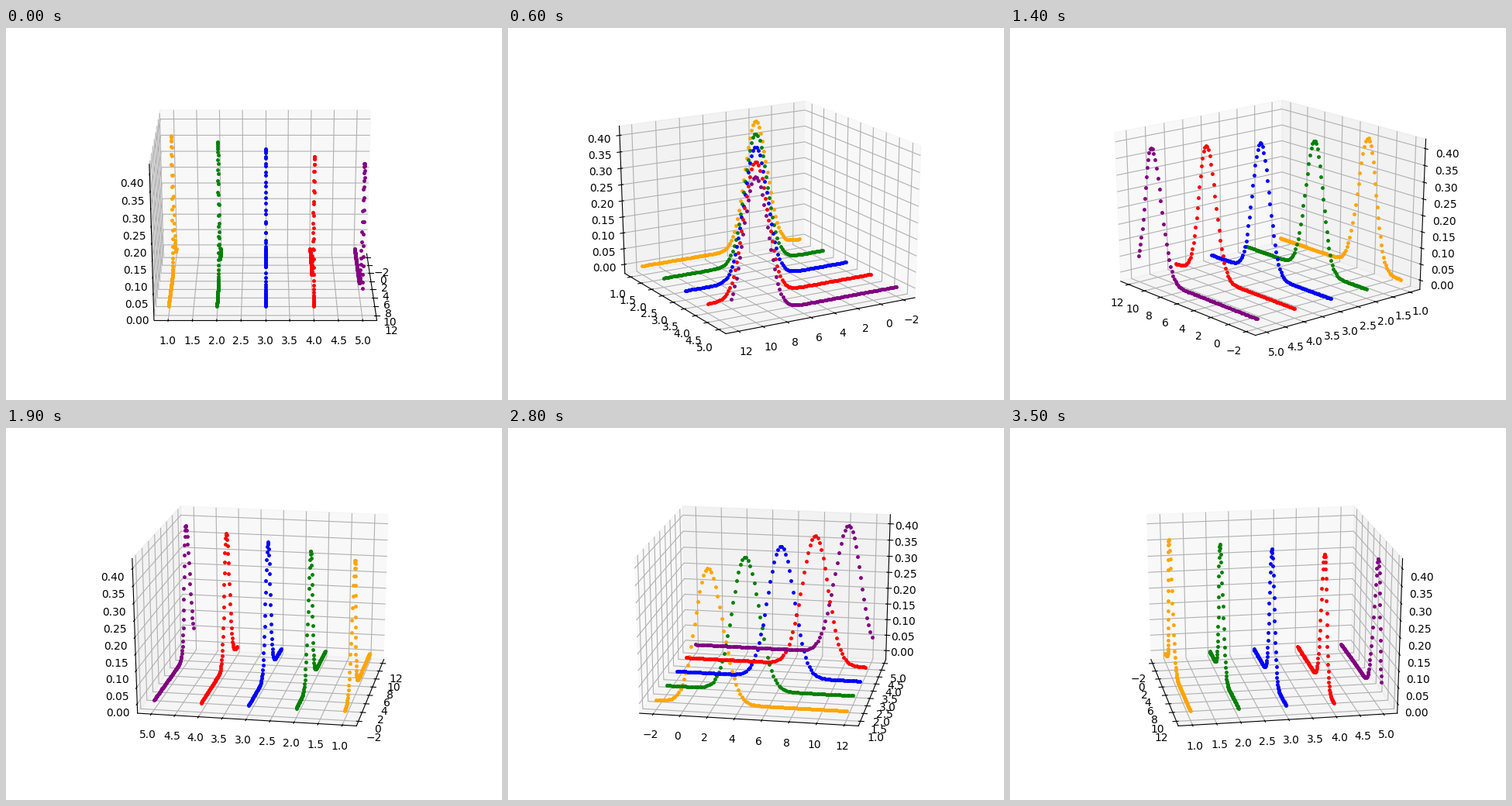
A matplotlib script for the animation above (3600 ms loop, 640 by 480 pixels).

```python
import numpy as np
import matplotlib.pyplot as plt
from matplotlib.animation import FuncAnimation
from mpl_toolkits.mplot3d import Axes3D

FRAMES = 36
COLORS = ["orange", "green", "blue", "red", "purple"]


class WideAxes(Axes3D):
    """3D axes that fill their whole rectangle instead of a square."""

    def apply_aspect(self, position=None):
        pass


def bell(x, mean):
    return np.exp(-(x - mean) ** 2 / 2) / np.sqrt(2 * np.pi)


def limits(lo, hi):
    """Data range with a 5% margin and a 1/48 border on each side."""
    mid, half = (lo + hi) / 2, (hi - lo) / 2
    half *= 1.1 * 25 / 24
    return mid - half, mid + half


fig = plt.figure(figsize=(6.4, 4.8), dpi=100, facecolor="white")
ax = WideAxes(fig, [0.125, 0.11, 0.775, 0.77])
fig.add_axes(ax)

x = np.linspace(-2, 12, 100)
top = 0
for row, color in enumerate(COLORS, 1):
    z = bell(x, 2 * row)
    top = max(top, z.max())
    ax.plot(x, np.full_like(x, row), z, ".", color=color, markersize=5)

ax.set_xticks(np.arange(-2, 13, 2))
ax.set_yticks(np.arange(1, 5.1, 0.5))
ax.set_zticks(np.arange(0, 0.41, 0.05))
ax.set_xlim(*limits(-2, 12))
ax.set_ylim(*limits(1, 5))
ax.set_zlim(*limits(0, top))
# Cube with sides of 25/24 world units
ax.set_box_aspect((1, 1, 1), zoom=np.sqrt(3) / 1.8294640721620434)


def update(i):
    ax.view_init(elev=22, azim=i * 360 / FRAMES)
    return []


anim = FuncAnimation(fig, update, frames=FRAMES, interval=100,
                     init_func=lambda: update(0), repeat=True, repeat_delay=0)
plt.show()
```
